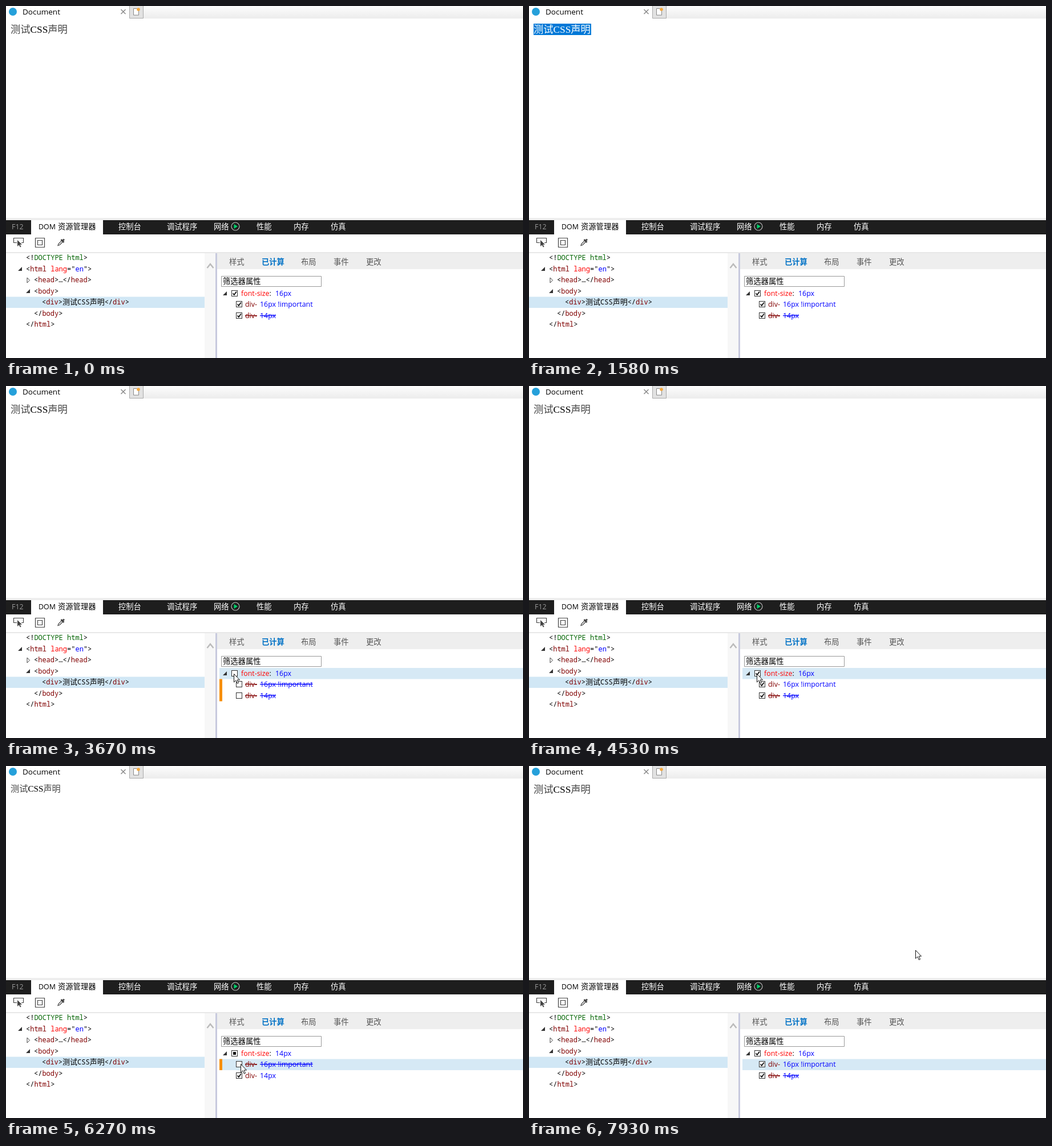
Animation, 906 px wide and 618 px high, one loop 7.99 s. Source, as an HTML page:

```html
<!DOCTYPE html>
<html lang="zh-CN">
<head>
<meta charset="utf-8">
<title>Document</title>
<style>
html, body { margin: 0; width: 100%; height: 100%; overflow: hidden; background: #fff; }
svg { display: block; width: 906px; height: 618px; }
text { font: 12.4px "Open Sans", "Noto Sans CJK SC", "Noto Sans CJK", sans-serif; white-space: pre; }
.cjk text, text.cjk { font-size: 13.3px; }
.page { font-family: "Liberation Serif", "Noto Sans CJK SC", "Noto Sans CJK", serif; font-size: 17.3px; font-weight: 300; }
.thin { fill: #444; }
.code text { font: 12px "Noto Sans Mono", "Noto Sans CJK SC", "Noto Sans CJK", monospace; }
.code .han { font-size: 13px; }
.bar text { fill: #fff; }
#tabs text { fill: #555; }
#tabs .on { fill: #0072c6; font-weight: 700; }
#tabs .hover { fill: #0072c6; }
.tag { fill: #800000; }
.attr { fill: #f00; }
.val { fill: #00f; }
.doc { fill: #006400; }
.strike text { text-decoration: line-through; }
.box rect { fill: #fff; stroke: #333; }
.box path { fill: none; stroke: #111; stroke-width: 1.8; visibility: hidden; }
.box .mark { fill: #111; stroke: none; visibility: hidden; }
.box.checked path, .box.mixed .mark { visibility: visible; }
</style>
</head>
<body>
<svg viewBox="0 0 906 618">
  <defs>
    <linearGradient id="shade" x2="0" y2="1">
      <stop stop-color="#fdfdfd"/><stop offset="1" stop-color="#ececec"/>
    </linearGradient>
    <clipPath id="clip"><rect id="clipBox" y="31" height="20"/></clipPath>
    <g id="check" class="box">
      <rect x=".5" y=".5" width="10" height="10"/>
      <path d="M2.5 5.5l2.3 2.5 4-5.5"/>
      <rect class="mark" x="3" y="3" width="5" height="5"/>
    </g>
  </defs>
  <rect width="906" height="618" fill="#fff"/>

  <!-- browser tab strip -->
  <rect x="216" width="690" height="22" fill="url(#shade)"/>
  <circle cx="12" cy="10" r="7" fill="#25a0da"/>
  <text x="29" y="15" style="font-size:13.5px">Document</text>
  <path d="M201.500 6l8 8m0-8l-8 8" stroke="#888" stroke-width="1.5"/>
  <path d="M216.500-1h24v22.500h-24z" fill="#e2e2e2" stroke="#ababab"/>
  <path d="M223.500 4.500h6l3 3v8.500h-9z" fill="#fff" stroke="#888"/>
  <circle cx="232" cy="6" r="2.8" fill="#f5a83c"/>

  <!-- page -->
  <text id="line" class="page" x="8" y="47"><tspan class="thin">测试</tspan>CSS<tspan class="thin">声明</tspan></text>
  <g id="sel">
    <rect id="selBox" y="31" height="20" fill="#0078d7"/>
    <text class="page" x="8" y="47" fill="#fff" clip-path="url(#clip)">测试CSS声明</text>
  </g>

  <!-- tool bar -->
  <path d="M0 372h906v4H0z" fill="#eee"/>
  <path d="M0 376h906v25H0z" fill="#1e1e1e"/>
  <path d="M44 376h126v25H44z" fill="#fff"/>
  <text x="10" y="392" fill="#999">F12</text>
  <text x="57" y="392">DOM</text>
  <text class="cjk" x="91" y="392">资源管理器</text>
  <g class="bar cjk">
    <text x="197" y="392">控制台</text>
    <text x="282" y="392">调试程序</text>
    <text x="364" y="392">网络</text>
    <text x="439" y="392">性能</text>
    <text x="504" y="392">内存</text>
    <text x="569" y="392">仿真</text>
  </g>
  <circle cx="402" cy="387" r="7" fill="none" stroke="#bbb" stroke-width="1.2"/>
  <path d="M399.500 383v8l6.500-4z" fill="#00d06a"/>
  <g fill="none" stroke="#444" stroke-width="1.2">
    <path d="M19 415.500h-5.500v-8h17v8H27"/>
    <path d="M20 411v11l2.800-2.500 2 4 1.700-.8-2-4h3.500z" fill="#444" stroke="none"/>
    <path d="M51.500 407.500h16v16h-16zM55.500 411.500h8v8h-8z"/>
    <path d="M91 420.500l1-3 6-6 2 2-6 6z"/>
    <path d="M96.500 410l5 5M99.500 412l2.500-2.500" stroke-width="2.8"/>
  </g>

  <!-- document tree -->
  <path d="M0 433h906" stroke="#d0d0d0"/>
  <path d="M348 434h19v184h-19z" fill="#f7f7f7"/>
  <path d="M352.500 460l5.500-7 5.500 7" fill="none" stroke="#bbb" stroke-width="2.5"/>
  <path d="M0 510.500h348v19.500H0z" fill="#d1e7f5"/>
  <path d="M28 458v7h-7zM42 497v7h-7z" fill="#333"/>
  <path d="M37 477l4.500 4.500-4.500 4.500z" fill="#fff" stroke="#444"/>
  <g class="code">
    <text x="35" y="446">&lt;!<tspan class="doc">DOCTYPE html</tspan>&gt;</text>
    <text x="35" y="465.5">&lt;<tspan class="tag">html</tspan> <tspan class="attr">lang</tspan>="<tspan class="val">en</tspan>"&gt;</text>
    <text x="49" y="485">&lt;<tspan class="tag">head</tspan>&gt;…&lt;/<tspan class="tag">head</tspan>&gt;</text>
    <text x="49" y="504.5">&lt;<tspan class="tag">body</tspan>&gt;</text>
    <text x="63" y="524">&lt;<tspan class="tag">div</tspan>&gt;<tspan class="han">测试</tspan>CSS<tspan class="han">声明</tspan>&lt;/<tspan class="tag">div</tspan>&gt;</text>
    <text x="49" y="543.5">&lt;/<tspan class="tag">body</tspan>&gt;</text>
    <text x="35" y="563">&lt;/<tspan class="tag">html</tspan>&gt;</text>
  </g>

  <!-- style pane -->
  <path d="M367 434h3v184h-3z" fill="#c8cade"/>
  <path d="M370 434h536v28H370z" fill="#eee"/>
  <g id="tabs" class="cjk">
    <text x="391" y="454">样式</text>
    <text x="448" y="454" class="on">已计算</text>
    <text x="517" y="454">布局</text>
    <text x="574" y="454">事件</text>
    <text x="631" y="454">更改</text>
  </g>
  <path d="M377.500 474.500h175v18h-175z" fill="#fff" stroke="#999"/>
  <text class="cjk" x="380" y="488">筛选器属性</text>
  <rect id="row" x="374" width="532" height="19.5" fill="#d6e9f5"/>
  <rect id="edit" x="374" y="514.5" width="5" fill="#f78f08"/>
  <path d="M387 501v7h-7z" fill="#333"/>
  <g id="boxes"></g>
  <text x="412" y="509"><tspan class="attr">font-size</tspan>:</text>
  <text id="size" class="val" x="472" y="509">16px</text>
  <g id="ruleA">
    <text class="tag" x="419" y="528">div-</text>
    <text class="val" x="445" y="528">16px !important</text>
  </g>
  <g id="ruleB">
    <text class="tag" x="419" y="548">div-</text>
    <text class="val" x="445" y="548">14px</text>
  </g>

  <path id="arrow" d="M.5.5v14.500l3.300-3.200 2.500 5.500 2.200-1-2.400-5.300h4.400z" fill="#fff" stroke="#111"/>
  <path id="beam" d="M-3.500-8h2.500l1 1 1-1h2.500M0-7v14M-3.500 8h2.500l1-1 1 1h2.500" fill="none" stroke="#111"/>
</svg>
<script>
const LOOP = 7990;
const $ = id => document.getElementById(id);

// Pointer moves: first step, last step, step count, end point
const moves = [
  [60, 60, 1, 742, 572],
  [120, 180, 2, 435, 313],
  [320, 920, 9, 112, 41],
  [995, 1070, 2, 88, 41],
  [1140, 1580, 7, 8, 41],
  [1810, 2030, 4, 133, 42],
  [2260, 2260, 1, 130, 37],
  [2490, 2850, 6, 377, 458],
  [2930, 3230, 5, 403, 504],
  [3370, 3370, 1, 467, 529],
  [3450, 3530, 2, 399, 505],
  [5440, 5440, 1, 404, 510],
  [5510, 5660, 3, 411, 523],
  [7330, 7710, 6, 615, 347],
  [7850, 7930, 2, 677, 323]
];

function pointer(t) {
  let x = 742, y = 572;
  for (const [from, to, steps, ex, ey] of moves) {
    if (t < from) break;
    const gap = steps > 1 ? (to - from) / (steps - 1) : 1;
    const done = Math.min(steps, Math.floor((t - from) / gap + 1e-6) + 1) / steps;
    x += (ex - x) * done;
    y += (ey - y) * done;
  }
  return [x, y];
}

const boxes = [[395, 499], [403, 518], [403, 538]].map(([x, y]) => {
  const g = $('check').cloneNode(true);
  g.removeAttribute('id');
  g.setAttribute('transform', `translate(${x} ${y})`);
  $('boxes').append(g);
  return g;
});
const tabs = [...$('tabs').children];
const within = (t, a, b) => t >= a && t < b;
const show = (el, on) => el.style.visibility = on ? 'visible' : 'hidden';
const set = (el, attrs) => { for (const k in attrs) el.setAttribute(k, attrs[k]); };

function drawSelection(t, x) {
  const on = within(t, 995, 1810);
  $('sel').style.display = on ? '' : 'none';
  if (!on) return;
  const line = $('line');
  const end = line.getEndPositionOfChar(6).x + 1;
  let start = end;
  for (let i = 0; i < 7; i++) {
    const edge = line.getStartPositionOfChar(i).x;
    if (Math.abs(edge - x) < Math.abs(start - x)) start = edge;
  }
  for (const id of ['selBox', 'clipBox']) set($(id), { x: start, width: end - start });
}

function drawRules(t) {
  const off = within(t, 3670, 4530), mix = within(t, 6270, 6880);
  const state = [off ? '' : mix ? 'mixed' : 'checked', off || mix ? '' : 'checked', off ? '' : 'checked'];
  boxes.forEach((b, i) => b.setAttribute('class', 'box ' + state[i]));
  $('ruleA').classList.toggle('strike', off || mix);
  $('ruleB').classList.toggle('strike', !mix);
  $('size').textContent = mix ? '14px' : '16px';
  set($('edit'), { height: off ? 39 : mix ? 19.5 : 0 });
  set($('row'), { y: t < 5890 ? 495 : 514.5 });
  show($('row'), t >= 3670);
  $('line').style.fontSize = mix ? '15.2px' : '17.3px';
  set($('line'), { y: mix ? 44.5 : 47 });
}

function draw(t) {
  const [x, y] = pointer(t);
  const text = within(t, 920, 2260);
  set($('arrow'), { transform: `translate(${Math.round(x)} ${Math.round(y)})` });
  set($('beam'), { transform: `translate(${Math.round(x) + .5} ${Math.round(y)})` });
  show($('arrow'), t >= 60 && !text);
  show($('beam'), text && !within(t, 1580, 1810));
  tabs.forEach(tab => {
    const left = +tab.getAttribute('x') - 15;
    const right = left + 30 + tab.textContent.length * 13.3;
    tab.classList.toggle('hover', t >= 60 && within(y, 434, 462) && within(x, left, right));
  });
  drawRules(t);
  drawSelection(t, x);
}

const began = performance.now();
function tick() {
  draw((performance.now() - began) % LOOP);
  requestAnimationFrame(tick);
}
tick();
</script>
</body>
</html>
```
